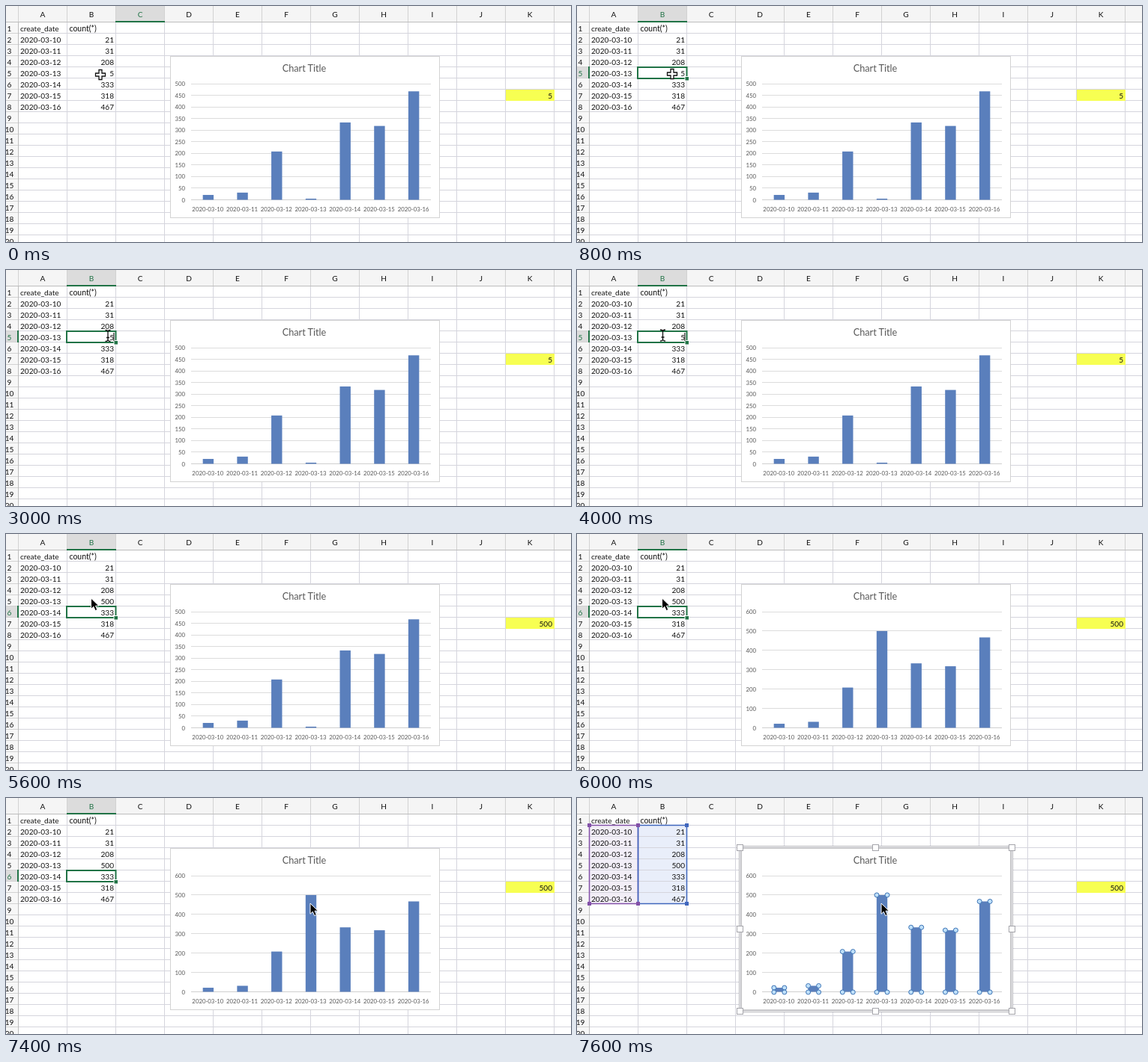
Recreate the animation shown at these times as an HTML page. Size 754x316 px, loop 8000 ms.

```html
<!DOCTYPE html>
<html lang="en">
<head>
<meta charset="utf-8">
<title>Spreadsheet chart update</title>
<style>
html, body { margin: 0; width: 100%; height: 100%; overflow: hidden; background: #fff; }
svg { display: block; }
text { font-family: Lato, "Open Sans", sans-serif; font-size: 10.1px; fill: #111; }
</style>
</head>
<body>
<svg id="stage" width="754" height="316" viewBox="0 0 754 316">
  <defs>
    <filter id="soft" x="-30%" y="-60%" width="160%" height="260%">
      <feDropShadow dx="0" dy="4" stdDeviation="4" flood-opacity=".3"/>
    </filter>
  </defs>
  <g id="sheet"></g>
  <g id="chart"></g>
  <g id="pointer"></g>
</svg>
<script>
const LOOP = 8000;
const GREEN = '#217346', BLUE = '#3f66bd', PURPLE = '#8250a8';
const counts = [21, 31, 208, 5, 333, 318, 467];
const dates = counts.map((_, i) => '2020-03-' + (10 + i));

// Each step overrides the properties it names; the rest carry over.
const steps = [
  [0,    { col: 2, row: 0, cell: '5', sum: '5', max: 500, cur: ['plus', 126, 92] }],
  [400,  { col: 1, row: 5, cur: ['plus', 127, 91] }],
  [1200, { cur: ['plus', 131, 88] }],
  [1400, { cur: ['plus', 136, 88] }],
  [2400, { caret: 1, cur: ['beam', 136, 88] }],
  [3800, { cur: ['beam', 122, 88] }],
  [4000, { cur: ['beam', 114.5, 87.5] }],
  [4600, { cell: '50' }],
  [4800, { cell: '500' }],
  [5000, { caret: 0 }],
  [5400, { row: 6 }],
  [5600, { sum: '500', cur: ['arrow', 113.5, 86] }],
  [6000, { max: 600 }],
  [6400, { cur: ['plus', 168, 110] }],
  [6600, { cur: ['move', 290, 136] }],
  [6800, { cur: ['move', 394, 136] }],
  [7000, { tip: 1, cur: ['move', 399.5, 134] }],
  [7200, { tip: 0, cur: ['arrow', 404, 139] }],
  [7400, { cur: ['arrow', 406, 141] }],
  [7600, { col: -1, row: 0, picked: 1 }]
];

const colX = i => 16 + 65 * i;
const rowY = n => 7 + 15 * n;
const attrs = a => Object.entries(a).map(([k, v]) => ` ${k}="${v}"`).join('');
const rect = (x, y, width, height, fill, more = {}) =>
  `<rect${attrs({ x, y, width, height, fill, ...more })}/>`;
const box = (x, y, w, h, stroke, width = 1, fill = 'none') =>
  rect(x, y, w, h, fill, { stroke, 'stroke-width': width });
const text = (s, x, y, anchor = 'start', style = '') =>
  `<text x="${x}" y="${y}" text-anchor="${anchor}" style="${style}">${s}</text>`;
const path = (d, fill, stroke, width) =>
  `<path${attrs({ d, fill, stroke, 'stroke-width': width })}/>`;

function drawHeaders(s) {
  let out = rect(0, 0, 754, 21, '#f5f5f5') + rect(0, 21, 16, 295, '#f7f7f7');
  if (s.col >= 0) out += rect(colX(s.col), 0, 65, 21, '#dcdcdc');
  if (s.row) out += rect(0, rowY(s.row), 16, 15, '#dcdcdc');
  for (let i = 0; i < 12; i++) out += rect(colX(i), 0, 1, 21, '#d2d2d2');
  for (let n = 1; n <= 20; n++) out += rect(0, rowY(n) + 14, 16, 1, '#d2d2d2');
  out += rect(0, 21, 754, 1, '#bdbdbd') + rect(16, 21, 1, 295, '#bdbdbd');
  if (s.col >= 0) out += rect(colX(s.col), 20, 66, 2, GREEN);
  if (s.row) out += rect(15, rowY(s.row) - 1, 2, 16, GREEN);
  [...'ABCDEFGHIJK'].forEach((c, i) => {
    out += text(c, colX(i) + 33, 14.5, 'middle', i === s.col ? 'fill:' + GREEN : '');
  });
  for (let n = 1; n <= 20; n++)
    out += text(n, 4.5, rowY(n) + 11.5, 'middle', n === s.row ? 'fill:' + GREEN : '');
  return out;
}

function drawSheet(s) {
  let out = rect(0, 0, 754, 316, '#fff');
  if (s.picked) out += rect(17, 37, 64, 105, '#f2eef7') + rect(82, 37, 64, 105, '#e9eefa');
  for (let i = 1; i < 12; i++) out += rect(colX(i), 22, 1, 294, '#d5d5dd');
  for (let n = 1; n < 20; n++) out += rect(17, rowY(n) + 14, 737, 1, '#d5d5dd');
  out += rect(667, 112, 65, 15, '#f7ff52') + drawHeaders(s);

  out += text('create_date', 19, 33.5) + text('count(*)', 84.5, 33.5, 'start', 'font-size:10.5px');
  dates.forEach((d, i) => {
    const y = rowY(i + 2) + 11.5;
    out += text(d, 19, y) + text(i === 3 ? s.cell : counts[i], 144, y, 'end');
  });
  out += text(s.sum, 729, 123.5, 'end');

  if (s.row) {
    const y = rowY(s.row);
    out += box(81, y, 65.5, 15, GREEN, 2) + rect(143.5, y + 12, 6, 6, '#fff')
         + rect(144.5, y + 13, 4.5, 4.5, GREEN);
  }
  if (s.caret) out += rect(143.4, 84, 1, 11, '#000');
  if (s.picked) {
    out += box(16.5, 36.5, 65, 105, PURPLE, 1.5) + box(81.5, 36.5, 65, 105, BLUE, 1.5);
    for (const y of [36.5, 141.5])
      for (const [x, c] of [[16.5, PURPLE], [81.5, PURPLE], [146.5, BLUE]])
        out += rect(x - 2.5, y - 2.5, 5, 5, c);
  }
  return out;
}

function drawChart(s) {
  const left = 247, base = 259.5, height = 155.5, slot = 320 / 7;
  const tick = s.max === 500 ? 50 : 100;
  const small = 'font-size:7.8px;fill:#595959';
  const top = v => base - height * v / s.max;
  let out = box(219.5, 67.5, 359, 216, '#d3d3d3', 1, '#fff');
  out += text('Chart Title', 398, 87.5, 'middle', 'font-size:12.7px;fill:#595959');
  for (let v = 0; v <= s.max; v += tick) {
    out += rect(left, Math.round(top(v) - .5), 320, 1, v ? '#dcdcdc' : '#cfcfcf')
         + text(v, 239, top(v) + 3, 'end', small);
  }
  let knobs = '';
  counts.forEach((n, i) => {
    const mid = left + slot * (i + .5);
    // The plotted value follows the sheet once the axis has rescaled.
    const y = top(i === 3 && s.max === 600 ? 500 : n);
    out += rect(mid - 7.2, y, 14.4, base - y, '#5a7fbc')
         + text(dates[i], mid - .5, 274.5, 'middle', small);
    if (!s.picked) return;
    for (const kx of [mid - 7, mid + 7])
      for (const ky of [y, base + .5])
        knobs += `<circle cx="${kx}" cy="${ky}" r="3" fill="#bfe0fa" stroke="#3d74b5"/>`;
  });
  if (s.picked) {
    out += knobs + box(217.5, 65.5, 363, 220, '#b4b4ba', 3) + box(217.5, 65.5, 363, 220, '#fff', 1);
    for (const x of [217.5, 398.5, 580.5])
      for (const y of [66.5, 175.5, 285.5])
        if (x !== 398.5 || y !== 175.5)
          out += box(x - 4, y - 4, 8, 8, '#a5a5ab', 1, '#fff');
  }
  if (s.tip) {
    out += rect(356.5, 131, 56.5, 19, '#ececec', { stroke: '#c4c4c4', 'stroke-width': .6, filter: 'url(#soft)' })
         + text('Plot Area', 360.5, 144.5, 'start', 'font-size:11.8px;fill:#222');
  }
  return out;
}

const arrow = path('M0 0V14.3L3.3 11.2L5.7 16.6L8.3 15.4L6 10.2H10.4Z', '#000', '#fff', 1);
const fourWay = path(
  'M0-7L3-4H1V-1H4V-3L7 0L4 3V1H1V4H3L0 7L-3 4H-1V1H-4V3L-7 0L-4-3V-1H-1V-4H-3Z',
  '#000', '#fff', .9);
const pointers = {
  plus: path('M-2-6.5H2V-2H6.5V2H2V6.5H-2V2H-6.5V-2H-2Z', '#fff', '#111', 1.3),
  beam: path('M-3.5-7.5Q0-7.5 0-5Q0-7.5 3.5-7.5M0-5V5M-3.5 7.5Q0 7.5 0 5Q0 7.5 3.5 7.5M-2 2.5H2',
    'none', '#111', 1.3),
  arrow,
  move: fourWay + arrow
};

function drawPointer({ cur: [kind, x, y] }) {
  return `<g transform="translate(${x} ${y})">${pointers[kind]}</g>`;
}

const layers = { sheet: drawSheet, chart: drawChart, pointer: drawPointer };
const start = performance.now();
let shown = -1;

function frame() {
  const t = Math.max(0, performance.now() - start) % LOOP;
  const index = steps.filter(([at]) => at <= t).length;
  if (index !== shown) {
    shown = index;
    const state = Object.assign({}, ...steps.slice(0, index).map(([, change]) => change));
    for (const id in layers) document.getElementById(id).innerHTML = layers[id](state);
  }
  requestAnimationFrame(frame);
}
frame();
</script>
</body>
</html>
```
